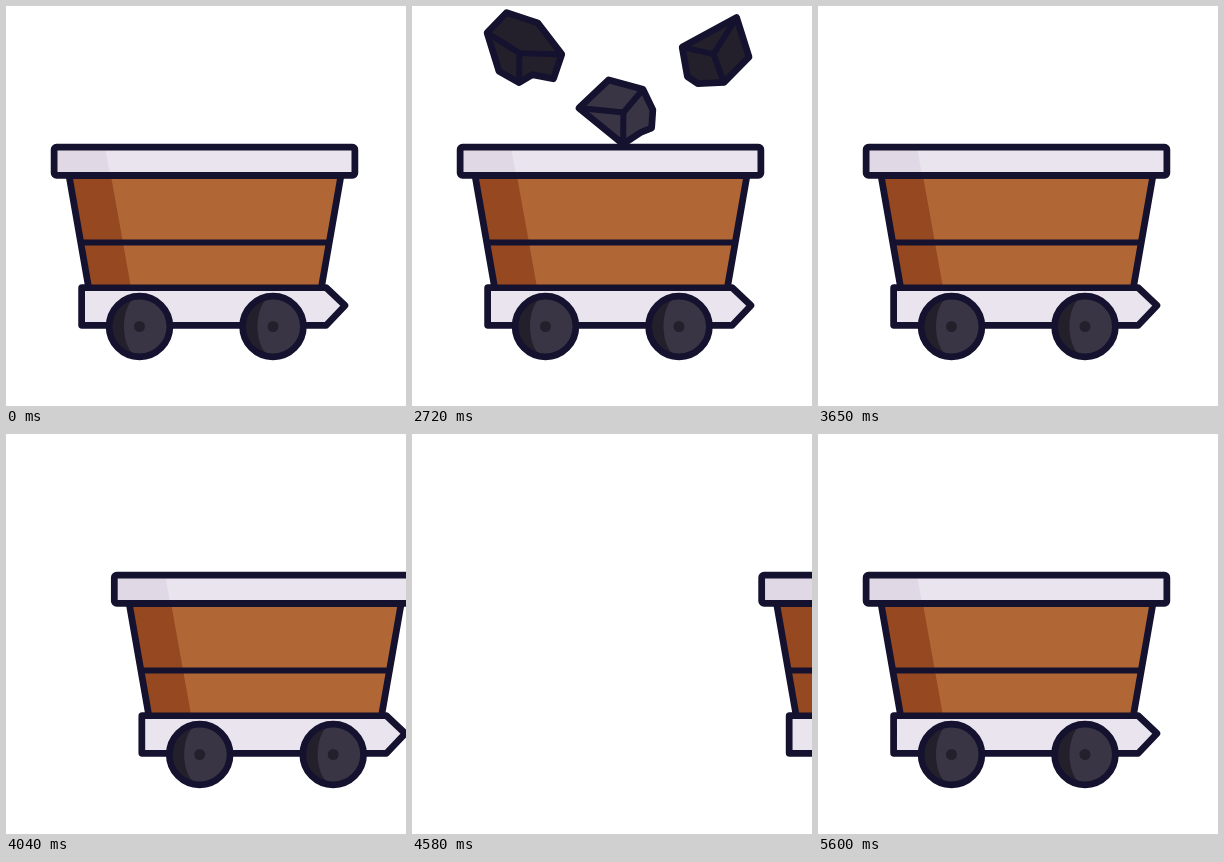
An HTML page with a canvas for the animation above (5630 ms loop, 400 by 400 pixels).

```html
<!DOCTYPE html>
<html lang="en">
<head>
<meta charset="utf-8">
<title>Coal wagon</title>
<style>
html, body { margin: 0; width: 100%; height: 100%; overflow: hidden; background: #fff; }
canvas { display: block; width: 100vmin; height: 100vmin; }
</style>
</head>
<body>
<canvas id="stage" width="400" height="400"></canvas>
<script>
const ctx = document.getElementById('stage').getContext('2d');
const LOOP = 5630, GRAVITY = 0.0012, LINE = 6, EDGE = 7.5;
const INK = '#15122f', LIGHT = '#e9e4ed', LIGHT_SHADE = '#e1d8e5';
const WOOD = '#b16735', WOOD_SHADE = '#964820';
const COAL = '#3a3545', COAL_DARK = '#24202b';

function poly(pts) {
  const path = new Path2D();
  pts.forEach(p => path.lineTo(...p));
  path.closePath();
  return path;
}

function circle(x, y, r) {
  const path = new Path2D();
  path.arc(x, y, r, 0, 2 * Math.PI);
  return path;
}

// Outlines around the centre; ridges run from the fork to the listed corners.
const sharp = {
  pts: [[-37, -2], [-8, -30], [26, -21], [36, -1], [35, 17], [25, 21], [7, 33]],
  fork: [7, 2], ridges: [0, 2, 6]
};
const notched = {
  pts: [[-17, -34], [14, -24], [38, 7], [30, 31], [9, 27], [-4, 35], [-24, 24], [-36, -14]],
  fork: [-4, 6], ridges: [2, 5, 7]
};
const wedge = {
  pts: [[20, -33], [32, 6], [7, 31], [-19, 32], [-29, 25], [-34, -4]],
  fork: [-3, 3], ridges: [0, 2, 5]
};

// Position, velocity, angle (degrees) and spin (degrees per ms) at time t.
const rocks = [
  { shape: sharp, fill: COAL, t: 2720, x: 204, y: 104, vx: 0.457, vy: 0.429, angle: 0, spin: 0.667 },
  { shape: notched, fill: COAL_DARK, t: 2720, x: 111, y: 41, vx: 0.42, vy: 0.15, angle: 0, spin: 0.36 },
  { shape: wedge, fill: COAL_DARK, t: 2720, x: 305, y: 45, vx: -0.42, vy: 0.15, angle: 0, spin: -0.36 },
  { shape: notched, fill: COAL_DARK, t: 3140, x: 291, y: 90, vx: -0.12, vy: 0.6, angle: 150, spin: -0.36 },
  { shape: sharp, fill: COAL, t: 3320, x: 200, y: 62, vx: 0.1, vy: 0.7, angle: 40, spin: 0.36 }
];

const bodyPts = [[63.5, 170], [334.5, 170], [315, 281.5], [83, 281.5]];
const body = poly(bodyPts);
const bodyShade = poly([bodyPts[0], [105, 170], [125, 281.5], bodyPts[3]]);
const rim = new Path2D();
rim.roundRect(48.5, 141.5, 300, 27.5, 2);
const rimShade = poly([[48.5, 141.5], [99, 141.5], [104, 169], [48.5, 169]]);
const chassis = poly([[76, 282], [320, 282], [338.5, 299.5], [320, 319], [76, 319]]);
const wheels = [133.5, 267].map(x => ({ x, y: 320.5 }));

const rad = deg => deg * Math.PI / 180;

function fill(path, color) {
  ctx.fillStyle = color;
  ctx.fill(path);
}

function stroke(path, width = LINE) {
  ctx.lineWidth = width;
  ctx.stroke(path);
}

function line(a, b) {
  const path = new Path2D();
  path.moveTo(...a);
  path.lineTo(...b);
  stroke(path);
}

function drawRock(rock, now) {
  const dt = now - rock.t;
  const y = rock.y + rock.vy * dt + GRAVITY / 2 * dt * dt;
  if (dt < -511 || now < 2210 || y > 205) return;
  ctx.save();
  ctx.translate(rock.x + rock.vx * dt, y);
  ctx.rotate(rad(rock.angle + rock.spin * dt));
  const { pts, fork, ridges } = rock.shape, path = poly(pts);
  stroke(path, EDGE);
  fill(path, rock.fill);
  stroke(path);
  ridges.forEach(i => line(fork, pts[i]));
  ctx.restore();
}

function drawWheel({ x, y }) {
  const disc = circle(x, y, 30), face = new Path2D();
  face.arc(x, y, 30, -Math.PI / 2, Math.PI / 2);
  face.ellipse(x, y, 15.5, 30, 0, Math.PI / 2, Math.PI * 1.5);
  stroke(disc, EDGE);
  fill(disc, COAL_DARK);
  fill(face, COAL);
  fill(circle(x, y, 5.5), COAL_DARK);
  stroke(disc);
}

function drawWagon(dx, tilt) {
  ctx.save();
  ctx.translate(dx, 0);

  ctx.save();
  ctx.translate(200, 295);
  ctx.rotate(rad(tilt));
  ctx.translate(-200, -295);
  // A slightly wider stroke underneath thickens only the silhouette.
  [body, rim, chassis].forEach(path => stroke(path, EDGE));
  fill(body, WOOD);
  fill(bodyShade, WOOD_SHADE);
  stroke(body);
  line([76, 236.6], [323, 236.6]);
  fill(chassis, LIGHT);
  stroke(chassis);
  fill(rim, LIGHT);
  fill(rimShade, LIGHT_SHADE);
  stroke(rim);
  ctx.restore();

  wheels.forEach(drawWheel);
  ctx.restore();
}

// Ease in and out: cubic Bezier (0.25, 0, 0.75, 1).
function ease(u) {
  let lo = 0, hi = 1;
  for (let i = 0; i < 24; i++) {
    const s = (lo + hi) / 2, r = 1 - s;
    if (0.75 * s * r * r + 2.25 * s * s * r + s * s * s < u) lo = s; else hi = s;
  }
  return hi * hi * (3 - 2 * hi);
}

function wobble(now) {
  const dt = now - 2740;
  if (dt < 0 || dt > 600) return 0;
  return 1.5 * Math.sin(Math.PI * dt / 600) * Math.sin(2 * Math.PI * dt / 240);
}

function draw(now) {
  ctx.clearRect(0, 0, 400, 400);
  ctx.strokeStyle = INK;
  ctx.lineJoin = ctx.lineCap = 'round';
  rocks.forEach(rock => drawRock(rock, now));
  // The full wagon leaves while an empty one follows from the left.
  const u = Math.min(1, Math.max(0, (now - 3750) / 1855));
  const shift = 700 * ease(u), tilt = wobble(now);
  drawWagon(shift, tilt);
  drawWagon(shift - 700, tilt);
}

const start = performance.now();
function tick() {
  draw((performance.now() - start) % LOOP);
  requestAnimationFrame(tick);
}
tick();
</script>
</body>
</html>
```
